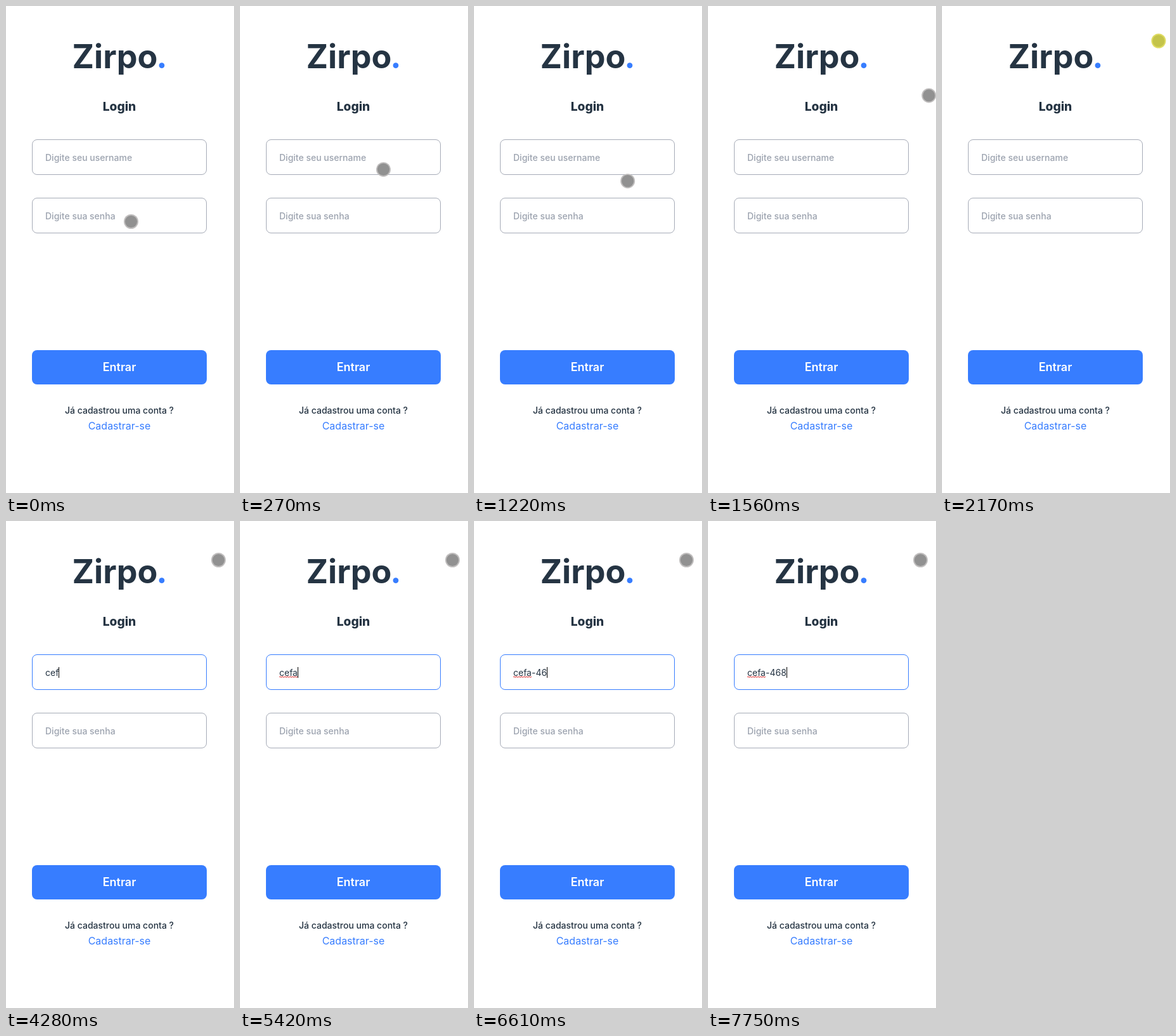
Animation, 360 px wide and 767 px high, one loop 8 s. Source, as an HTML page:

```html
<!DOCTYPE html>
<html lang="pt-BR">
<head>
<meta charset="utf-8">
<title>Login</title>
<style>
  html, body { margin: 0; width: 100%; height: 100%; overflow: hidden; background: #fff; }
  svg { display: block; width: 100%; height: 100%; }
  text { font-family: Inter, sans-serif; font-size: 14px; fill: #253443; }
  .mid { text-anchor: middle; }
  .brand { font-size: 52px; font-weight: 700; }
  .heading { font-size: 19.2px; font-weight: 800; }
  .hint { font-weight: 500; fill: #9ca3af; }
  .action { font-size: 18px; font-weight: 600; fill: #fff; }
  .note { font-weight: 500; }
  .link { font-size: 16px; }
  .blue { fill: #377dff; }
  .field { fill: none; stroke: #a6abb7; }
  .field.focus { stroke: #377dff; }
  .ring { fill: #c0bebe; }
  .core { fill: #919191; }
  .pressed .ring { fill: #dfdc62; }
  .pressed .core { fill: #c4c44a; }
</style>
</head>
<body>
<svg viewBox="0 0 360 767">
  <defs>
    <pattern id="wave" x="62" y="244" width="4" height="3" patternUnits="userSpaceOnUse">
      <path d="M-1 3L1 .8L3 2.4L5 .8" fill="none" stroke="#e02020"/>
    </pattern>
  </defs>

  <text class="brand mid" x="172" y="97.5">Zirpo</text>
  <text class="brand mid blue" x="246" y="97.5">.</text>
  <text class="heading mid" x="179" y="165">Login</text>

  <rect class="field" id="userField" x="41.5" y="210.5" width="275" height="55" rx="7.5"/>
  <text class="hint" id="userHint" x="62" y="244">Digite seu username</text>
  <text id="typed" x="62" y="244"></text>
  <rect id="squiggle" x="62" y="244" height="3" fill="url(#wave)"/>
  <rect id="caret" y="230" width="1" height="17"/>

  <rect class="field" x="41.5" y="302.5" width="275" height="55" rx="7.5"/>
  <text class="hint" x="62" y="336">Digite sua senha</text>

  <rect class="blue" x="41" y="542" width="276" height="54" rx="8"/>
  <text class="action mid" x="179" y="575">Entrar</text>
  <text class="note mid" x="179" y="642">Já cadastrou uma conta ?</text>
  <text class="link mid blue" x="179" y="667">Cadastrar-se</text>

  <g id="pointer">
    <circle class="ring" r="11.5"/>
    <circle class="core" r="9.6"/>
  </g>
</svg>
<script>
  const LOOP = 8000, LEFT = 62;
  const TICK = 67.8;   // the pointer moves once per tick
  const BLINK = 504;
  const FOCUS = 3080, CHECK = 5420;
  const PRESS = [2170, 2305];

  const BURSTS = [
    { at: 3940, text: 'ce', gap: 70 },
    { at: 4280, text: 'fa', gap: 130 },
    { at: 5620, text: '-', gap: 0 },
    { at: 6480, text: '468', gap: 130 }
  ];
  const KEYS = BURSTS.flatMap(({ at, text, gap }) =>
    [...text].map((char, i) => ({ char, at: at + i * gap })));

  // turning points of the pointer
  const PATH = [
    { t: 0, x: 197.5, y: 339.5 },
    { t: 270, x: 226.5, y: 257.5 },
    { t: 400, x: 224, y: 247 },
    { t: 820, x: 214.5, y: 247 },
    { t: 1155, x: 214.5, y: 247 },
    { t: 1220, x: 242.5, y: 275.5 },
    { t: 1356, x: 303, y: 322.5 },
    { t: 1424, x: 300, y: 244 },
    { t: 1560, x: 349, y: 140.5 },
    { t: 1700, x: 380, y: 140.5 },
    { t: 1898, x: 362, y: 55 },
    { t: 2168, x: 342, y: 55 },
    { t: 2240, x: 342, y: 55 },
    { t: 2575, x: 335.5, y: 61.5 }
  ];

  const el = id => document.getElementById(id);
  const [field, hint, typed, squiggle, caret, pointer] =
    ['userField', 'userHint', 'typed', 'squiggle', 'caret', 'pointer'].map(el);
  const show = (node, on) => node.setAttribute('visibility', on ? 'visible' : 'hidden');
  const mix = (a, b, k) => a + (b - a) * k;

  function setTyped(text) {
    typed.textContent = text;
    return text ? typed.getComputedTextLength() : 0;
  }

  squiggle.setAttribute('width', setTyped('cefa'));

  function pointerAt(t) {
    const snapped = Math.floor((t + 4) / TICK) * TICK;
    const next = PATH.findIndex(p => p.t > snapped);
    if (next < 0) return PATH[PATH.length - 1];
    const a = PATH[next - 1], b = PATH[next];
    const k = (snapped - a.t) / (b.t - a.t);
    return { x: mix(a.x, b.x, k), y: mix(a.y, b.y, k) };
  }

  function render(t) {
    const keys = KEYS.filter(key => key.at <= t);
    const width = setTyped(keys.map(key => key.char).join(''));
    show(hint, !keys.length);
    show(squiggle, t >= CHECK);
    field.classList.toggle('focus', t >= FOCUS);

    const active = keys.length ? keys[keys.length - 1].at : FOCUS;
    caret.setAttribute('x', Math.round(LEFT + width));
    show(caret, t >= FOCUS && Math.floor((t - active) / BLINK) % 2 === 0);

    const { x, y } = pointerAt(t);
    pointer.setAttribute('transform', `translate(${x} ${y})`);
    pointer.classList.toggle('pressed', t >= PRESS[0] && t < PRESS[1]);
  }

  const start = performance.now();
  function tick() {
    render((performance.now() - start) % LOOP);
    requestAnimationFrame(tick);
  }
  tick();
</script>
</body>
</html>
```
